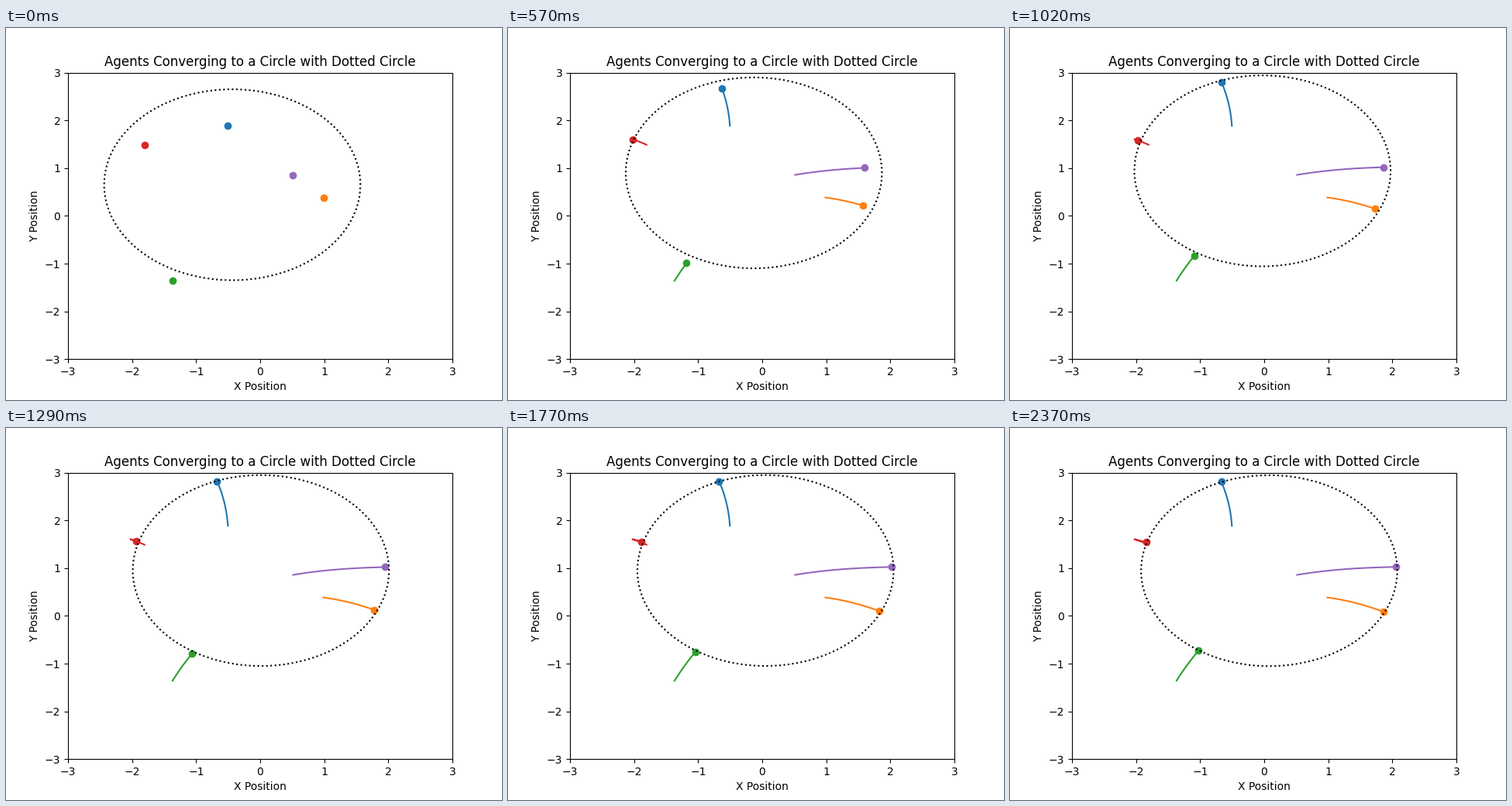
These frames come from a looping animation (640x480 px, 2400 ms). A matplotlib script:

```python
import numpy as np
import matplotlib.pyplot as plt
from matplotlib.animation import FuncAnimation

AGENTS = 5
RADIUS = 2.0
GAIN = 0.1
FRAMES = 80
INTERVAL = 30


def step(pos):
    """Move every agent part of the way to the circle around the centroid."""
    offset = pos - pos.mean(axis=0)
    dist = np.linalg.norm(offset, axis=1, keepdims=True)
    return pos + GAIN * (RADIUS - dist) * offset / dist


def simulate():
    rng = np.random.RandomState(42)
    pos = rng.uniform(-2, 2, (AGENTS, 2))
    path = []
    for _ in range(FRAMES):
        pos = step(pos)
        path.append(pos)
    return np.array(path)


path = simulate()
theta = np.linspace(0, 2 * np.pi, 100)
ring = RADIUS * np.column_stack([np.cos(theta), np.sin(theta)])

fig, ax = plt.subplots(figsize=(6.4, 4.8), dpi=100)
ax.set_xlim(-3, 3)
ax.set_ylim(-3, 3)
ax.set_xlabel("X Position")
ax.set_ylabel("Y Position")
ax.set_title("Agents Converging to a Circle with Dotted Circle")

colors = [f"C{i}" for i in range(AGENTS)]
dots = [ax.plot([], [], "o", color=c)[0] for c in colors]
trails = [ax.plot([], [], "-", color=c, lw=1.5)[0] for c in colors]
circle, = ax.plot([], [], "k:", lw=1.5)


def update(frame):
    for i, (dot, trail) in enumerate(zip(dots, trails)):
        x, y = path[:frame + 1, i].T
        dot.set_data(x[-1:], y[-1:])
        trail.set_data(x, y)
    circle.set_data(*(path[frame].mean(axis=0) + ring).T)
    return [*dots, *trails, circle]


anim = FuncAnimation(fig, update, frames=FRAMES, interval=INTERVAL,
                     repeat=True, repeat_delay=0)
plt.show()
```
